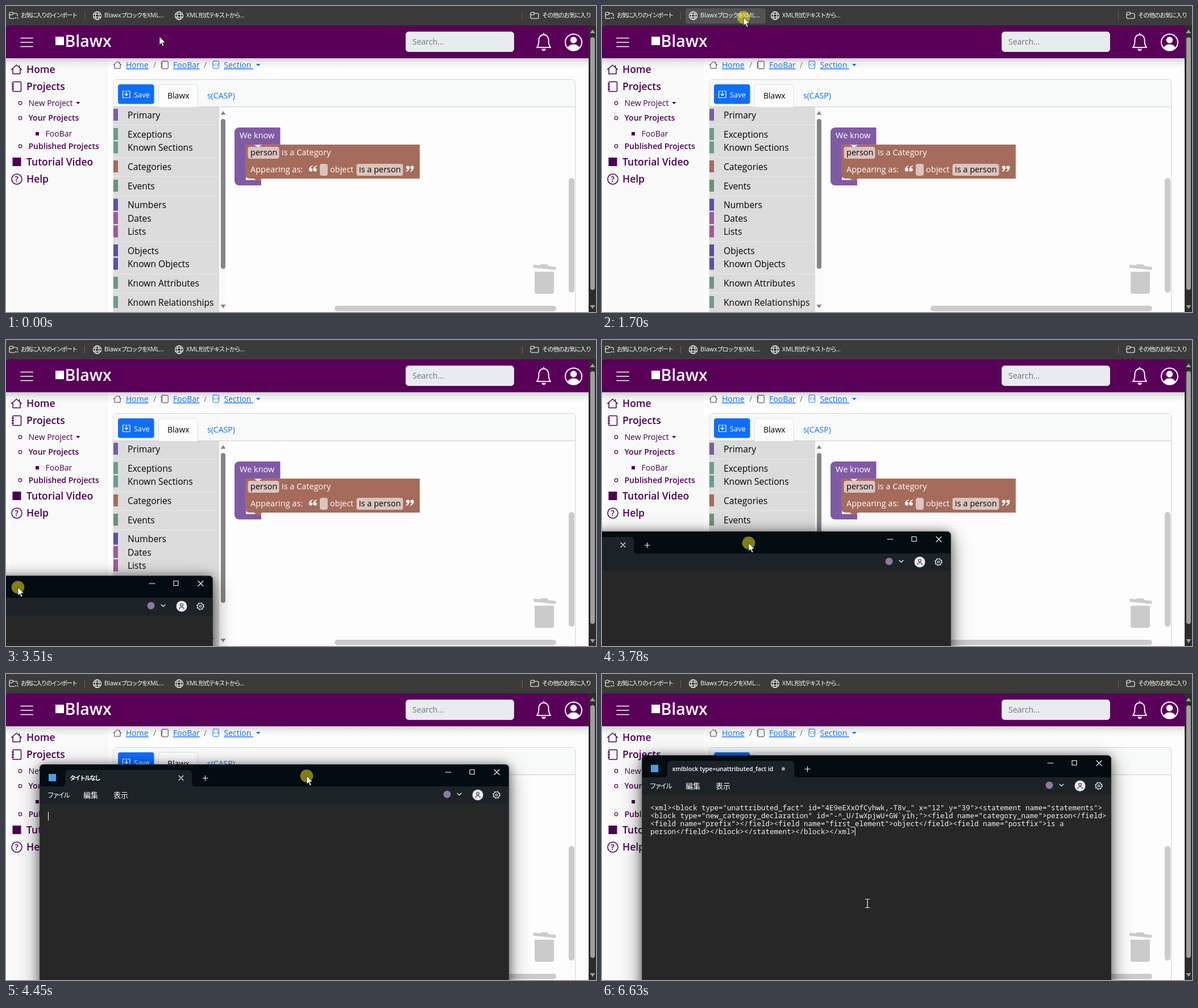
Write an HTML page that moves like this. It is 1038 px wide and 539 px high and loops after 6.9 s.

```html
<!DOCTYPE html>
<html lang="ja">
<head>
<meta charset="utf-8">
<title>Copying block XML into a text editor</title>
<style>
html, body { margin: 0; width: 100%; height: 100%; overflow: hidden; background: #fdfdfd; }
svg { display: block; width: 1038px; height: 539px; overflow: hidden; }
text { font-family: "Open Sans", "Noto Sans", sans-serif; font-size: 14px; white-space: pre; }
.jp { font-family: "Noto Sans CJK JP", "Noto Sans CJK", sans-serif; font-size: 10.7px; fill: #fff; }
.jp tspan { font-family: "Open Sans", sans-serif; letter-spacing: 0; }
.bold { font-weight: 600; }
.big { font-weight: 600; font-size: 17.5px; }
.side { fill: #4b0052; }
.block { font-size: 14.5px; }
.cat { font-size: 15.6px; fill: #000; }
.link { fill: #0d6efd; }
.u { text-decoration: underline; }
.code { font-family: "Noto Sans Mono", "Liberation Mono", monospace; font-size: 12.5px; fill: #f4f4f4; }
.line { fill: none; stroke-linejoin: round; stroke-linecap: round; }
</style>
</head>
<body>
<svg viewBox="0 0 1038 539">
<defs>
  <linearGradient id="fade" x2="0" y2="1">
    <stop offset="0" stop-color="#000" stop-opacity=".17"/>
    <stop offset=".45" stop-color="#000" stop-opacity=".06"/>
    <stop offset="1" stop-color="#000" stop-opacity="0"/>
  </linearGradient>
  <filter id="near" x="-10%" y="-10%" width="120%" height="120%"><feGaussianBlur stdDeviation="8"/></filter>
  <filter id="far" x="-15%" y="-15%" width="130%" height="130%"><feGaussianBlur stdDeviation="18"/></filter>
  <clipPath id="face"><circle r="14"/></clipPath>
  <path id="house" class="line" d="M-9 0L0-8L9 0M-6.5-2V7.5H6.5V-2M5-4V-7"/>
  <g id="book" class="line"><rect x="-6.5" y="-8.500" width="14.500" height="17" rx="1.500"/>
    <path d="M-8-4.500h3M-8 0h3M-8 4.500h3"/></g>
  <g id="globe" class="line" stroke="#fff" stroke-width="1.100"><circle r="7"/>
    <ellipse rx="3.200" ry="7"/><path d="M-6.500-2.500h13M-6.500 2.500h13"/></g>
  <path id="folder" class="line" stroke="#fff" stroke-width="1.100" d="M-7-4q0-2 2-2h3l2 2h5q2 0 2 2v5q0 2-2 2h-10q-2 0-2-2zM-7-1.500h5l2-2.500"/>
  <path id="quote" fill="#fff" d="M6.500 0C2 1 0 4.500 0 7.600a3.100 3.100 0 1 0 3-3.200C3.400 3 4.800 2 6.500 1.400zm7.500 0c-4.500 1-6.500 4.500-6.500 7.600a3.100 3.100 0 1 0 3-3.200c.4-1.400 1.800-2.400 3.500-3z"/>
</defs>

<rect width="1038" height="539" fill="#fdfdfd"/>

<!-- sidebar -->
<rect x="8" y="92" width="169" height="447" fill="#f9f9f9"/>
<rect x="177" y="92" width="1" height="447" fill="#f2f2f2"/>
<g class="side">
  <g stroke="#4b0052" stroke-width="1.500">
    <use href="#house" x="18.500" y="112"/><use href="#book" x="18.500" y="142"/>
    <circle class="line" cx="19" cy="305" r="9"/>
    <g class="line" stroke-width="1.200"><circle cx="25" cy="171" r="2.800"/><circle cx="25" cy="197.500" r="2.800"/><circle cx="25" cy="247" r="2.800"/></g>
  </g>
  <rect x="52" y="222" width="6" height="6"/>
  <rect x="11.500" y="267" width="15" height="15"/>
  <text class="big" x="36" y="118">Home</text>
  <text class="big" x="36" y="148">Projects</text>
  <text x="39.500" y="176">New Project</text>
  <path d="M123 169h7.500l-3.750 4z"/>
  <text class="bold" x="39.500" y="202">Your Projects</text>
  <text x="69.500" y="230">FooBar</text>
  <text class="bold" x="39.500" y="252">Published Projects</text>
  <text class="big" x="36" y="281">Tutorial Video</text>
  <text class="big" x="36" y="311">Help</text>
  <text class="bold" x="15.500" y="310">?</text>
</g>

<!-- breadcrumb -->
<g stroke="#3a2440" stroke-width="1.200"><use href="#house" transform="translate(196 104) scale(.78)"/><use href="#book" transform="translate(279 104) scale(.78)"/></g>
<g class="line" stroke="#0d6efd"><rect x="364" y="97" width="10.500" height="13" rx="1.500"/><path d="M368 101.500l-2 2 2 2M371 101.500l2 2-2 2"/></g>
<text class="link u" x="211" y="109">Home</text>
<text class="link u" x="294" y="109">FooBar</text>
<text class="link u" x="383.500" y="109">Section </text>
<path class="link" d="M440 102h7.500l-3.750 4z"/>
<g fill="#6c757d"><text x="259" y="109">/</text><text x="348" y="109">/</text></g>

<!-- editor card -->
<rect x="189" y="129.500" width="812.500" height="430" rx="5" fill="#fdfdfd" stroke="#d2d3d4"/>
<path d="M189.500 177V135q0-5 5-5H996q5 0 5 5V177z" fill="#f8f9f9"/>
<path d="M189 177.500H1001" stroke="#cdcecf"/>
<path d="M268.500 178V143q0-5 5-5h58.500q5 0 5 5v35" fill="#fdfdfd" stroke="#dcdedf"/>
<rect x="197" y="138" width="63.500" height="34.500" rx="4" fill="#0d6efd"/>
<g class="line" stroke="#fff" stroke-width="1.200"><path d="M209 150h-3.500v11.500h12.500V150h-3.500M211.750 149v8.500M209 155l2.750 2.750 2.750-2.750"/></g>
<text x="225" y="160.500" fill="#fff" style="font-size:12.800px;font-weight:500">Save</text>
<text x="284" y="163">Blawx</text>
<text class="link" x="354" y="163">s(CASP)</text>

<!-- toolbox -->
<rect x="189" y="178" width="186" height="361" fill="#dcdcdc"/>
<g id="toolbox"></g>
<rect x="375" y="178" width="14" height="361" fill="#fafafa"/>
<g fill="#858585"><rect x="378" y="199" width="8" height="264" rx="4"/><path d="M377.500 191.500h9l-4.500-6.500zM377.500 526h9l-4.500 6.500z"/></g>

<!-- workspace -->
<g fill="#cbcbcb">
  <rect x="990" y="303" width="10" height="202" rx="5"/>
  <rect x="578" y="528" width="390" height="9.500" rx="4.750"/>
  <path d="M930 468h34v35q0 4-4 4h-26q-4 0-4-4zM928 455.500l11.500 1.200 1.500-1.700h11l2.500 3.200 13 1.300-.6 5.500-39-4z"/>
</g>
<path d="M402 222a8 8 0 0 1 8-8h72.500v30.500H422v62h27V316h-39a8 8 0 0 1-8-8z" fill="#805ba5"/>
<path d="M422 296v10h27v-3h-17z" fill="#fff"/>
<path d="M421 244h15l6 4h3l6-4h277v60H451l-6 4h-3l-6-4h-7q-8 0-8-8z" fill="#a56b5b"/>
<path d="M451 244.500h276.500v59" class="line" stroke="#b98275" stroke-width=".8"/>
<g fill="#dbc4be"><rect x="425.500" y="248" width="55" height="21" rx="4"/><rect x="552" y="278" width="14" height="21" rx="4"/><rect x="616.500" y="278" width="82" height="21" rx="4"/></g>
<g fill="#fff">
  <text class="block" x="411" y="232.500">We know</text>
  <text class="block" x="485" y="263">is a Category</text>
  <text class="block" x="430" y="293">Appearing as:</text>
  <text class="block" x="570" y="293">object</text>
</g>
<text class="block" x="430" y="263">person</text>
<text class="block" x="621" y="293">is a person</text>
<use href="#quote" x="533" y="281"/>
<use href="#quote" transform="translate(717.500 292) rotate(180)"/>

<!-- header -->
<rect y="92" width="1025" height="17" fill="url(#fade)"/>
<rect width="1038" height="60" fill="#3b3b3b"/>
<path d="M0 92V40q0-6 6-6H1025V92z" fill="#590059"/>
<path d="M26 56.500H47M26 64H47M26 71.500H47" class="line" stroke="#fff" stroke-width="1.700"/>
<rect x="87" y="54" width="15" height="15" fill="#fff"/>
<text x="103.500" y="71.500" fill="#fff" style="font-size:28.500px;font-weight:600">Blawx</text>
<rect x="703.500" y="45.500" width="190" height="35" rx="5" fill="#e9ecef" stroke="#ced4da"/>
<text x="715" y="68" fill="#6c757d">Search...</text>
<g transform="translate(946 63.500)" class="line" stroke="#fff" stroke-width="1.900">
  <path d="M0-13C-6-12.500-8.500-8-8.500-4C-8.500 2-9.500 7-12 9.500H12C9.500 7 8.500 2 8.500-4C8.500-8 6-12.500 0-13zM0-15v2"/>
  <path d="M-4 12q1 3.500 4 3.500t4-3.500z" fill="#fff" stroke="none"/>
</g>
<g transform="translate(998.500 64)"><circle r="14.500" class="line" stroke="#fff" stroke-width="2"/>
  <circle cy="-4" r="5.800" fill="#fff"/><ellipse cy="12" rx="11" ry="8.500" fill="#fff" clip-path="url(#face)"/></g>

<!-- page scrollbar -->
<rect x="1025" y="34" width="13" height="505" fill="#2c2c2c"/>
<g fill="#9f9f9f"><rect x="1028" y="55" width="8" height="445" rx="4"/><path d="M1027.500 48h9l-4.500-6.500zM1027.500 527h9l-4.500 6.500z"/></g>

<!-- bookmarks -->
<rect id="hover" x="147" y="4" width="141" height="27" rx="4" fill="#545454"/>
<use href="#folder" x="13" y="17"/>
<rect x="15" y="18" width="8" height="6" fill="#3b3b3b"/>
<g fill="#fff"><circle cx="17" cy="21" r="1"/><circle cx="20.500" cy="21" r="1"/></g>
<use href="#globe" x="160.500" y="17"/><use href="#globe" x="304.500" y="17"/>
<use href="#folder" x="930" y="17"/>
<path d="M138.500 10V24M908.500 10V24" stroke="#7c5a5a"/>
<g id="bookmarks"></g>

<!-- text editor window -->
<g id="win">
  <rect y="10" width="826" height="640" rx="8" opacity=".5" filter="url(#far)"/>
  <rect y="1" width="826" height="640" rx="8" opacity=".4" filter="url(#near)"/>
  <path d="M0 640V8q0-8 8-8H818q8 0 8 8V640z" fill="#020c11"/>
  <path d="M0 39H39q6 0 6-6V17q0-7 7-7H261q7 0 7 7V33q0 6 6 6H826V70H0z" fill="#1b2327"/>
  <rect y="70" width="826" height="570" fill="#272727"/>
  <path d="M.5 640V8q0-7.500 7.500-7.500H818q7.500 0 7.500 7.500V640" class="line" stroke="#3a4246" stroke-width=".7"/>
  <rect x="16" y="17" width="13" height="13" fill="#4a9fe0"/>
  <g class="line" stroke="#fff" stroke-width="1.100">
    <path id="tabClose" d="M245 20l8 8m0-8l-8 8"/>
    <path d="M287 24.500h9M291.500 20v9M714 14h10M757 9.500h8v8h-8zM800 9.500l9 9m0-9l-9 9M735 51l3.500 3.500 3.500-3.500"/>
    <circle cx="804" cy="54" r="5.200"/><circle cx="804" cy="54" r="1.800"/>
    <circle cx="804" cy="54" r="6.300" stroke-dasharray="2.400 2.550" stroke-linecap="butt"/>
  </g>
  <circle id="dirty" cx="249" cy="24" r="3" fill="#a0a4a6"/>
  <circle cx="717" cy="53" r="6.500" fill="#8d78a5"/>
  <circle cx="771" cy="54" r="9.500" fill="#ececec"/>
  <g class="line" stroke="#333" stroke-width="1.100"><circle cx="771" cy="51.500" r="2.300"/><path d="M767 59q0-3.500 4-3.500t4 3.500"/></g>
  <g id="menu"></g>
  <text id="title" class="bold" x="53.500" y="28" fill="#fff" style="font-size:10.500px">xmlblock type=unattributed_fact id</text>
  <g id="body"></g>
  <rect id="caret" width="1" height="15" fill="#fff"/>
</g>

<circle id="press" r="11.300" fill="#fff20a" opacity=".5"/>
<path id="arrow" d="M0 0V14.500L3.300 11.400L5.700 17L8 16L5.600 10.500H10.300z" fill="#fff" stroke="#222" stroke-width=".8"/>
<path id="beam" class="line" d="M-3.500-7.500H-1.500Q0-7.500 0-6V6Q0 7.500-1.500 7.500H-3.500M3.500-7.500H1.500Q0-7.500 0-6M0 6Q0 7.500 1.500 7.500H3.500" stroke="#f2f2f2" stroke-width="1.200"/>
</svg>
<script>
const LOOP = 6900;
const el = id => document.getElementById(id);
const show = (id, on) => { el(id).style.display = on ? '' : 'none'; };
const move = (id, x, y) => el(id).setAttribute('transform', `translate(${x} ${y})`);
const esc = s => s.replace(/&/g, '&amp;').replace(/</g, '&lt;');

// Japanese label; Latin runs get their own face
const jp = (x, y, s, gap, style = '', id = '') =>
  `<text class="jp" ${id && `id="${id}"`} x="${x}" y="${y}" style="letter-spacing:${gap}px;${style}">` +
  s.replace(/[A-Za-z.]+/g, '<tspan>$&</tspan>') + '</text>';

const violet = '#805ba5', teal = '#6c9c92', indigo = '#5b51a3', plum = '#9e5b9a';
const categories = [
  ['Primary', 192, violet], ['Exceptions', 226, teal], ['Known Sections', 249.5, teal],
  ['Categories', 283, '#a56b5b'], ['Events', 317, '#6a917a'], ['Numbers', 350.5, indigo],
  ['Dates', 374, plum], ['Lists', 397.5, plum], ['Objects', 431, indigo],
  ['Known Objects', 454.5, indigo], ['Known Attributes', 488, '#6a9881'], ['Known Relationships', 522, teal]
];
el('toolbox').innerHTML = categories.map(([name, y, color], i) => {
  const next = categories[i + 1];
  const rule = next && next[1] - y > 30 ? `<path d="M189 ${y + 17.5}H375" stroke="#e8e8e8"/>` : '';
  return `<rect x="189" y="${y - 11}" width="8" height="21" fill="${color}"/>` +
    `<text class="cat" x="214" y="${y + 5.5}">${name}</text>${rule}`;
}).join('');

el('bookmarks').innerHTML =
  jp(26, 20, 'お気に入りのインポート', -1.75) +
  jp(173, 20, 'BlawxブロックをXML...', -1.55) +
  jp(317, 20, 'XML形式テキストから...', -1.55) +
  jp(943, 20, 'その他のお気に入り', -1.1);

el('menu').innerHTML =
  jp(53, 28, 'タイトルなし', -1.9, 'font-weight:700', 'untitled') +
  jp(13.5, 59, 'ファイル', -2.5, 'font-size:12px') +
  jp(77, 59, '編集', 0, 'font-size:13px') +
  jp(130, 59, '表示', 0, 'font-size:13px');

const xml = [
  '<xml><block type="unattributed_fact" id="4E9eEXxOfCyhwk,-T8v_" x="12" y="39"><statement name="statements">',
  '<block type="new_category_declaration" id="-^_U/IwXpjwU+GW`yih;"><field name="category_name">person</field>',
  '<field name="prefix"></field><field name="first_element">object</field><field name="postfix">is a',
  'person</field></block></statement></block></xml>'
];
el('body').innerHTML = xml.map((s, i) =>
  `<text class="code" x="15" y="${96.5 + i * 14.2}">${esc(s)}</text>`).join('');

// [time, x, y], each held until the next
const windowPath = [
  [3300, -650, 478], [3370, -595, 460], [3440, -530, 438], [3510, -462, 415],
  [3570, -400, 396], [3640, -335, 376], [3710, -272, 357], [3780, -212, 337],
  [3850, -162, 313], [3910, -120, 290], [3980, -74, 264], [4050, -40, 241],
  [4110, -15, 222], [4180, 7, 202], [4250, 24, 187], [4320, 38, 176],
  [4380, 49, 167], [4450, 59, 159], [4530, 65, 151], [4600, 69, 146], [4670, 70, 143]
];
const pointerPath = [
  [0, 270, 54], [20, 280, 42], [90, 285, 33],
  [290, 276, 30], [360, 262, 25], [430, 252, 22], [510, 249, 20],
  [2360, 226, 32], [2430, 170, 58], [2500, 104, 88], [2570, 45, 114], [2640, 6, 130], [2700, -50, 150],
  [4800, 520, 172], [4870, 472, 202], [4940, 415, 240], [5010, 370, 270], [5080, 342, 287], [5150, 333, 293],
  [6020, 348, 308], [6090, 385, 342], [6160, 430, 376], [6230, 458, 397], [6300, 467, 404]
];
const held = (path, t) => path.filter(k => k[0] <= t).pop();

// While dragging, the pointer runs slightly ahead of the window
function pointerAt(t, win) {
  if (t < 3300 || t >= 4800) return held(pointerPath, t).slice(1);
  const lead = Math.max(0, 3780 - win[0]) * 0.048;
  return [win[1] + 470 + lead, win[2] + 20.5];
}

function draw(t) {
  const win = held(windowPath, t);
  const pasted = t >= 5350, titled = t >= 5420;
  show('win', win);
  if (win) move('win', win[1], win[2]);
  show('body', pasted);
  show('title', titled);
  show('dirty', titled);
  show('untitled', !titled);
  show('tabClose', !titled);
  show('caret', (t >= 4270 && t < 4800) || (pasted && t < 6090) || t >= 6630);
  move('caret', pasted ? 374.8 : 15, pasted ? 127 : 84);

  const clicked = t >= 1700 && t < 1900;
  const [x, y] = pointerAt(t, win);
  const inText = t >= 4800 && y > 213;
  show('hover', clicked);
  show('press', clicked || (t >= 3300 && t < 4670));
  show('arrow', !inText);
  show('beam', inText);
  for (const id of ['press', 'arrow', 'beam']) move(id, x, y);
}

const start = performance.now();
function tick() {
  draw((performance.now() - start) % LOOP);
  requestAnimationFrame(tick);
}
tick();
</script>
</body>
</html>
```
